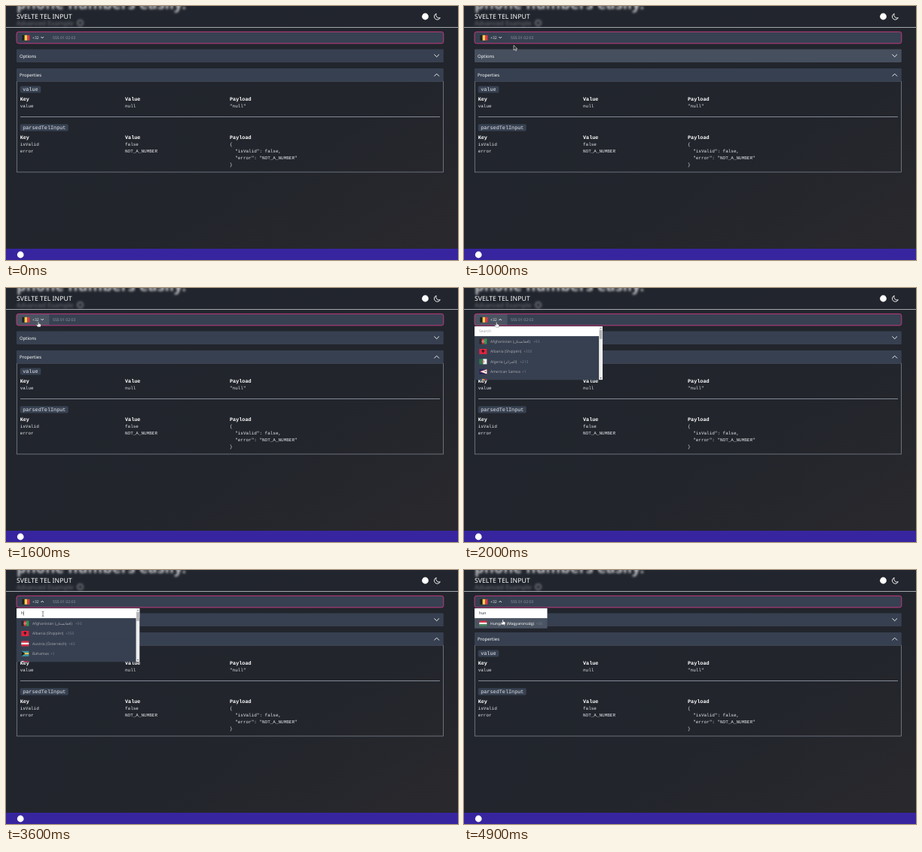
Animation of 600 by 338 pixels, one loop 5000 ms. Source, as an HTML page:

```html
<!DOCTYPE html>
<html lang="en">
<head>
<meta charset="utf-8">
<title>Svelte Tel Input</title>
<style>
html, body { margin: 0; width: 100%; height: 100%; overflow: hidden; background: #22262e; }
svg { display: block; width: 100%; height: 100%; text-rendering: geometricPrecision; }
text { font: 5.1px "Noto Sans", "DejaVu Sans", sans-serif; fill: #fff; white-space: pre; }
.m { font: 5.97px "Liberation Mono", monospace; fill: #e5e7eb; }
.k { font: 6.82px "Liberation Mono", monospace; fill: #e5e7eb; }
.b { font-weight: bold; fill: #fff; }
.bar { font-size: 5.97px; }
</style>
</head>
<body>
<svg viewBox="0 0 600 338">
  <defs>
    <linearGradient id="bg" x2="1" y2="1">
      <stop offset="0" stop-color="#21252d"/>
      <stop offset=".6" stop-color="#22252c"/>
      <stop offset="1" stop-color="#2a292d"/>
    </linearGradient>
    <filter id="blur" x="-10%" y="-50%" width="120%" height="200%"><feGaussianBlur stdDeviation="1.4"/></filter>
    <clipPath id="drop"><rect id="dropBox" x="14" y="51"/></clipPath>
  </defs>
  <rect width="600" height="338" fill="url(#bg)"/>
  <g filter="url(#blur)">
    <text x="14" y="3.5" style="font-size:20px;font-weight:800">phone numbers easily.</text>
    <g opacity=".5">
      <text x="14" y="25.5" style="font-size:8.5px">Advanced Example</text>
      <circle cx="98.500" cy="22.500" r="3.500" fill="none" stroke="#fff" stroke-width="2"/>
    </g>
  </g>
  <rect width="600" height="28" fill="#22262e" opacity=".3"/>
  <rect y="28" width="600" height=".9" fill="#b4b7bd"/>
  <text x="14" y="17" style="font-size:8.7px">SVELTE TEL INPUT</text>
  <circle cx="556.500" cy="14" r="4.400" fill="#fff"/>
  <path d="M576.3 15.7A4.1 4.1 0 1 1 571.2 10.2A4 4 0 0 0 576.300 15.700Z" fill="none" stroke="#fff" stroke-width=".9" stroke-linejoin="round"/>
  <rect y="323" width="600" height="15" fill="#37259f"/>
  <circle cx="19.200" cy="331" r="4.400" fill="#fff"/>
  <g id="panel"></g>
  <g id="live"></g>
</svg>
<script>
const $ = id => document.getElementById(id);
const LOOP = 5000, OPEN = 1690;
const rect = (x, y, w, h, fill, more = '') =>
  `<rect x="${x}" y="${y}" width="${w}" height="${h}" fill="${fill}" ${more}/>`;
const text = (x, y, s, cls = '', more = '') => `<text x="${x}" y="${y}" class="${cls}" ${more}>${s}</text>`;
const path = (d, more) => `<path d="${d}" ${more}/>`;
const mix = k => `rgb(${55 + 20 * k},${64 + 20 * k},${80 + 18 * k})`;

// Properties panel
function section(y, name, badgeW, rows, payload) {
  const cols = [18.7, 158, 297];
  let out = rect(18.7, y, badgeW, 9.2, '#374151', 'rx="1.7"') + text(22.2, y + 6.6, name, 'k');
  ['Key', 'Value', 'Payload'].forEach((s, i) => out += text(cols[i], y + 20, s, 'k b'));
  rows.forEach((r, j) => r.forEach((s, i) => out += text(cols[i], y + 29 + 9 * j, s, 'm')));
  payload.forEach((s, j) => out += text(cols[2], y + 29 + 9 * j, s, 'm'));
  return out;
}
$('panel').innerHTML =
  rect(14.3, 100, 566.2, 121, 'none', 'stroke="#8b919c" stroke-width=".7"') +
  rect(19, 147.1, 557, .8, '#9ca3af') +
  section(106.4, 'value', 27.6, [['value', 'null']], ['"null"']) +
  section(157.3, 'parsedTelInput', 64, [['isValid', 'false'], ['error', 'NOT_A_NUMBER']],
    ['{', '  "isValid": false,', '  "error": "NOT_A_NUMBER"', '}']);

// Flags: stripes plus an optional extra shape on a 10 x 7 field
function flag(x, y, [dir, cols, extra = '']) {
  const n = cols.length;
  const stripes = cols.map((c, i) => dir == 'v'
    ? rect(i * 10 / n, 0, 10 / n + .05, 7, c) : rect(0, i * 7 / n, 10, 7 / n + .05, c)).join('');
  return `<g transform="translate(${x} ${y})">${stripes}${extra}</g>`;
}
const fill = (d, c) => path(d, `fill="${c}"`);
const belgium = ['v', ['#20201f', '#f5d24b', '#e0394a']];
const C = {
  af: ['Afghanistan (افغانستان)', '+93', 92, ['v', ['#2a2a2a', '#c8323c', '#2c9a50'],
    '<circle cx="5" cy="3.500" r="1.300" fill="none" stroke="#fff" stroke-width=".5"/>']],
  al: ['Albania (Shqipëri)', '+355', 79, ['h', ['#e02440'], fill('M5 1L7.200 2.500L5.800 4L5 6L4.200 4L2.800 2.500Z', '#33141c')]],
  dz: ['Algeria (الجزائر)', '+213', 74, ['v', ['#2a7d48', '#f2f2f2'],
    '<circle cx="5" cy="3.500" r="1.400" fill="none" stroke="#d3304a" stroke-width=".6"/>']],
  as: ['American Samoa', '+1', 77, ['h', ['#24285f'], fill('M10 0V7L0 3.500Z', '#c8364a') + fill('M10 .6V6.400L1.500 3.500Z', '#fff') +
    fill('M6 3L9.500 2.400L8.500 4.500Z', '#8a5a3a')]],
  ad: ['Andorra', '+376', 57, ['v', ['#2440a0', '#f5d24b', '#d0304a']]],
  at: ['Austria (Österreich)', '+43', 83, ['h', ['#dc3048', '#fff', '#dc3048']]],
  bs: ['Bahamas', '+1', 59, ['h', ['#3a95a8', '#f2d24c', '#3a95a8'], fill('M0 0L5 3.500L0 7Z', '#1e1e1e')]],
  bh: ['Bahrain', '+973', 57, ['h', ['#d0304a'], fill('M0 0H3L4 1L3 2L4 3.500L3 5L4 6L3 7H0Z', '#fff')]],
  bt: ['Bhutan', '+975', 55, ['h', ['#f2c33c'], fill('M10 0V7H0Z', '#e8662c')]],
  hu: ['Hungary (Magyarország)', '+36', 95.500, ['h', ['#d23246', '#fff', '#3f8a58']]],
  lt: ['Lithuania (Lietuva)', '+370', 81, ['h', ['#f2c33c', '#2f8050', '#c8323c']]]
};

// Typing: time, query, list width, matches
const steps = [
  [OPEN, '', 170, 'af al dz as ad'],
  [3480, 'h', 163.5, 'af al at bs bh'],
  [3680, 'hu', 97, 'bt hu lt'],
  [3850, 'hun', 96.7, 'hu']
];
const FOCUS = 2480, ROW = 13.4;

// Pointer: time, x, y
const track = [[550, 190, 342], [820, 75, 82], [940, 67, 61], [1000, 66, 52.3], [1250, 64, 51],
  [1550, 43, 45], [1950, 43, 45], [2400, 49, 58.3], [4350, 49, 58.3], [4650, 51.5, 66]];
function pointer(t) {
  if (t < track[0][0]) return [-99, -99];
  const i = track.findIndex(p => p[0] > t);
  if (i < 0) return track.at(-1).slice(1);
  const [a, b] = [track[i - 1], track[i]];
  let u = (t - a[0]) / (b[0] - a[0]);
  if (t > 1000) u = u * u * (3 - 2 * u);
  return [a[1] + (b[1] - a[1]) * u, a[2] + (b[2] - a[2]) * u];
}
// Hover colours fade over 150 ms
function hover(t, x0, x1, y0, y1) {
  let sum = 0;
  for (let i = 0; i < 15; i++) {
    const [x, y] = pointer(t - i * 10);
    sum += x > x0 && x < x1 && y > y0 && y < y1;
  }
  return sum / 15;
}

const arrow = path('M0 0V6.500L1.600 5.100L2.700 7.400L3.700 6.900L2.600 4.700H4.700Z',
  'fill="#222" stroke="#fff" stroke-width=".6" stroke-linejoin="round"');
const hand = path('M-.6 .4Q0 -.4 .6 .4V2.600L2.900 3.200Q3.500 3.500 3.400 4.200L2.800 6.700H-.9L-2.600 4.200Q-2.300 3.200 -1.300 3.900L-.6 4.400Z',
  'fill="#fff" stroke="#333" stroke-width=".35"');
const beam = path('M-1.400 -3.200Q0 -3.200 0 -2.400Q0 -3.200 1.400 -3.200M0 -2.400V2.600M-1.400 3.300Q0 3.300 0 2.500Q0 3.300 1.400 3.300',
  'fill="none" stroke="#555" stroke-width=".7"');

const chevron = (x, y, w, up) => path(`M${x - w} ${y + (up ? w : -w) / 2}L${x} ${y + (up ? -w : w) / 2}L${x + w} ${y + (up ? w : -w) / 2}`,
  'fill="none" stroke="#fff" stroke-width=".9" stroke-linecap="round" stroke-linejoin="round"');

function bar(t, y, label, up) {
  const h = t < OPEN ? hover(t, 14, 580, y, y + 17.5) : 0;
  return rect(14, y, 566.8, 17.6, mix(h), 'rx="1"') + text(18, y + 11.1, label, 'bar') + chevron(571.7, y + 8.7, 3, up);
}

function field(t, open) {
  const h = hover(t, 14, 57, 34, 50.5) * (t < 2200);
  return rect(14, 34.4, 566.8, 15.4, '#374151', 'rx="2.5"') +
    path('M57.5 34.400H16.500Q14 34.400 14 36.900V47.300Q14 49.800 16.500 49.800H57.500Z', `fill="${mix(h)}"`) +
    rect(14, 34.4, 566.8, 15.4, 'none', 'rx="2.5" stroke="#c0397f" stroke-width="1"') +
    flag(21.3, 38.8, belgium) + text(35, 44, '+32', '', 'fill-opacity=".8"') +
    chevron(48.2, 42, 1.5, open) + text(62, 44, '555 01 02 03', '', 'style="fill:#9098a5"');
}

function dropdown(t, [start, query, w, keys]) {
  const list = keys.split(' ').map(k => C[k]);
  const long = list.length > 4, h = long ? 71.3 : ROW * (list.length + 1);
  $('dropBox').setAttribute('width', w);
  $('dropBox').setAttribute('height', h);
  let out = rect(14, 51, w, h, '#374151') + rect(14, 51, w, 13.3, '#fff');
  out += query ? text(20, 59.4, query, '', 'style="fill:#1f2937"') : text(20, 59.4, 'Search', '', 'style="fill:#9ca3af"');
  list.forEach(([name, code, x, f], i) => {
    const y = 64.3 + ROW * i, on = hover(t, 14, 14 + w, y, y + ROW);
    const g = 165 + 90 * on;
    out += rect(14, y, w, ROW, mix(on)) + flag(20.3, y + 3.3, f) +
      text(35, y + 8.6, name, '', `style="font-size:5px;fill:rgb(${g},${g + 0},${Math.min(255, g + 8)})"`) +
      text(x, y + 8.6, code, '', 'style="font-size:5px;fill:#737c8b"');
  });
  const since = t - Math.max(start, FOCUS);
  if (since >= 0 && since % 1200 < 600) out += rect(20.1 + [0, 3.2, 6.3, 9.4][query.length], 54.6, .5, 6, '#222');
  if (long) {
    const x = 14 + w - 4.9, c = x + 2.45;
    out += rect(x, 51, 4.9, 71.3, '#ededed') + rect(x + .6, 56, 3.7, 11.8, '#b4b4b4') +
      fill(`M${c - 1.2} 54.200H${c + 1.2}L${c} 52.800Z`, '#777') + fill(`M${c - 1.2} 119.300H${c + 1.2}L${c} 120.700Z`, '#444');
  }
  return `<g clip-path="url(#drop)">${out}</g>`;
}

function draw(now) {
  const t = now % LOOP, step = steps.findLast(s => t >= s[0]);
  const [x, y] = pointer(t);
  let out = field(t, !!step) + bar(t, 57.5, 'Options', false) + bar(t, 83, 'Properties', true);
  if (step) out += dropdown(t, step);
  const onButton = x < 57 && y > 34 && y < 50.5, onBar = y > 57.5 && y < 75 || y > 83 && y < 100.5;
  const shape = step && y > 51 && y < 64.3 ? beam : onButton || onBar || step && y > 64.3 ? hand : arrow;
  out += `<g transform="translate(${x} ${y})">${shape}</g>`;
  $('live').innerHTML = out;
  requestAnimationFrame(frame);
}
const begin = performance.now();
const frame = () => draw(performance.now() - begin);
frame();
</script>
</body>
</html>
```
